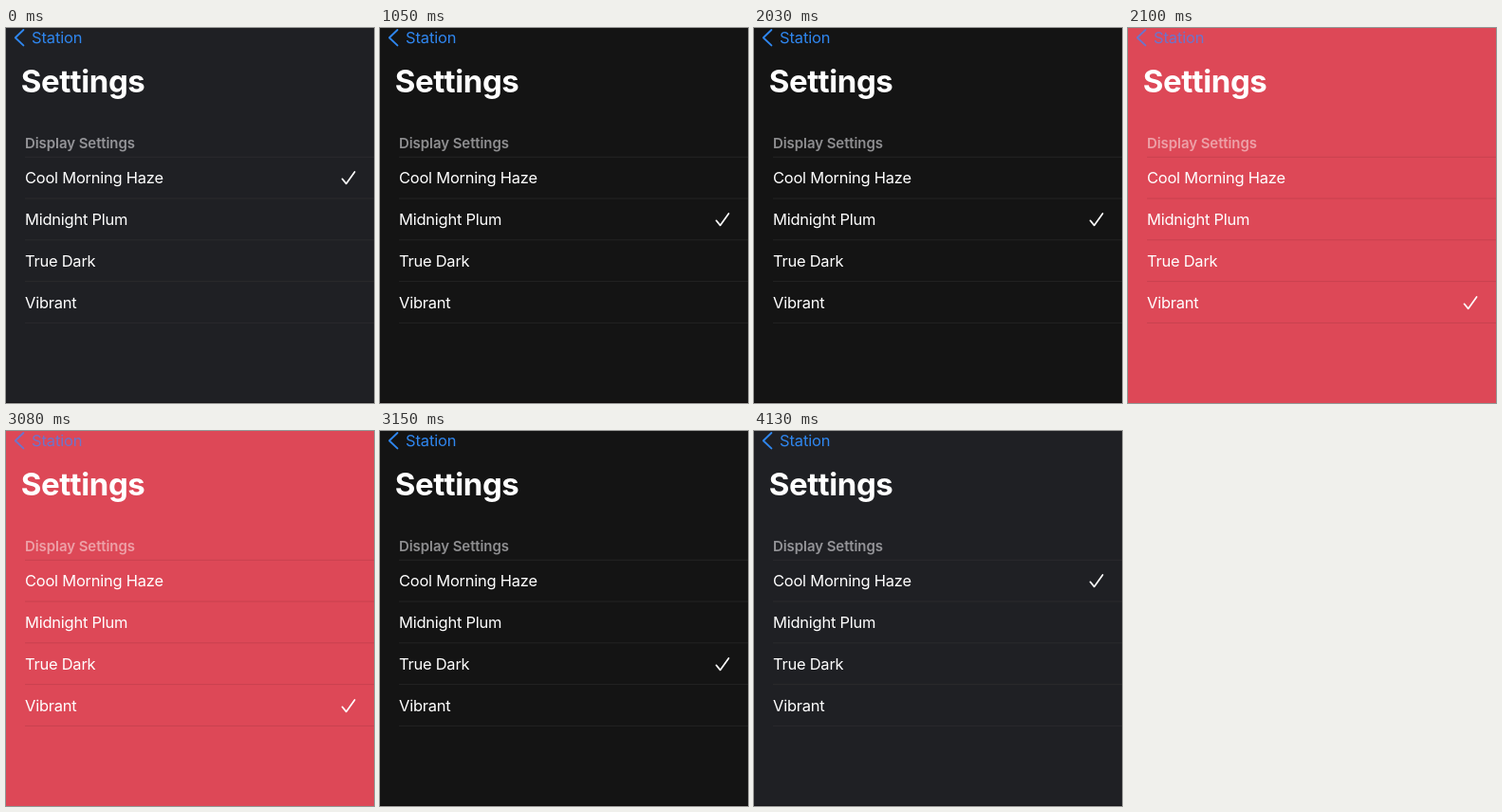
Write an HTML page that moves like this. It is 388 px wide and 396 px high and loops after 5040 ms.

```html
<!DOCTYPE html>
<html lang="en">
<head>
<meta charset="utf-8">
<title>Display settings</title>
<style>
  html, body { margin: 0; width: 100%; height: 100%; overflow: hidden; }
  svg { display: block; width: 388px; height: 396px; background: var(--bg);
        font: 16.5px Inter, sans-serif; letter-spacing: -.015em; fill: #fff; }
  .back { fill: var(--link); letter-spacing: -.008em; }
  .title { font-size: 33px; font-weight: 700; letter-spacing: -.012em; }
  .label { font-size: 15px; font-weight: 600; letter-spacing: -.005em; fill: var(--label); }
  .line { stroke: var(--line); }
  .edge { fill: var(--edge); }
  .stroke { fill: none; stroke-width: 1.7; stroke-linecap: round; stroke-linejoin: round; }
</style>
</head>
<body>
<svg viewBox="0 0 388 396">
  <rect class="edge" y="395" width="388" height="1"/>
  <path class="stroke" d="M18.4 2L9.8 10.2L18.4 18.4" style="stroke: var(--link); stroke-width: 1.9"/>
  <text class="back" x="27" y="16">Station</text>
  <text class="title" x="15.7" y="68">Settings</text>
  <text class="label" x="20" y="126.5">Display Settings</text>
  <path class="line" d="M20 136.3H388"/>
  <g id="rows"></g>
  <path id="check" class="stroke" stroke="#fff" d="M354.5 159.3L358.7 164.4L367.6 152"/>
</svg>
<script>
const LOOP = 5040, ROW = 44;
const names = ['Cool Morning Haze', 'Midnight Plum', 'True Dark', 'Vibrant'];
const haze = { bg: '#1f2024', line: '#2a2a2d', label: '#949498', link: '#2f86ee', edge: '#17161a' };
const dark = { bg: '#141414', line: '#232323', label: '#8e8e90', link: '#2f86ee', edge: '#0f0b0c' };
const vibrant = { bg: '#dd4857', line: '#c8414f', label: '#eda0a7', link: '#6d74ca', edge: '#dd4857' };
const steps = [
  { at: 0, row: 0, theme: haze },
  { at: 1050, row: 1, theme: dark },
  { at: 2100, row: 3, theme: vibrant },
  { at: 3150, row: 2, theme: dark },
  { at: 4130, row: 0, theme: haze },
];

const svg = document.querySelector('svg');
const check = document.getElementById('check');
document.getElementById('rows').innerHTML = names.map((name, i) =>
  `<text x="20" y="${164 + ROW * i}">${name}</text>
   <path class="line" d="M20 ${180 + 43.8 * i}H388"/>`).join('');

function draw(now) {
  const time = now % LOOP;
  const { row, theme } = steps.findLast(step => step.at <= time);
  for (const key in theme) svg.style.setProperty('--' + key, theme[key]);
  check.setAttribute('transform', `translate(0 ${ROW * row})`);
}

const start = performance.now();
function tick() {
  draw(performance.now() - start);
  requestAnimationFrame(tick);
}
tick();
</script>
</body>
</html>
```
